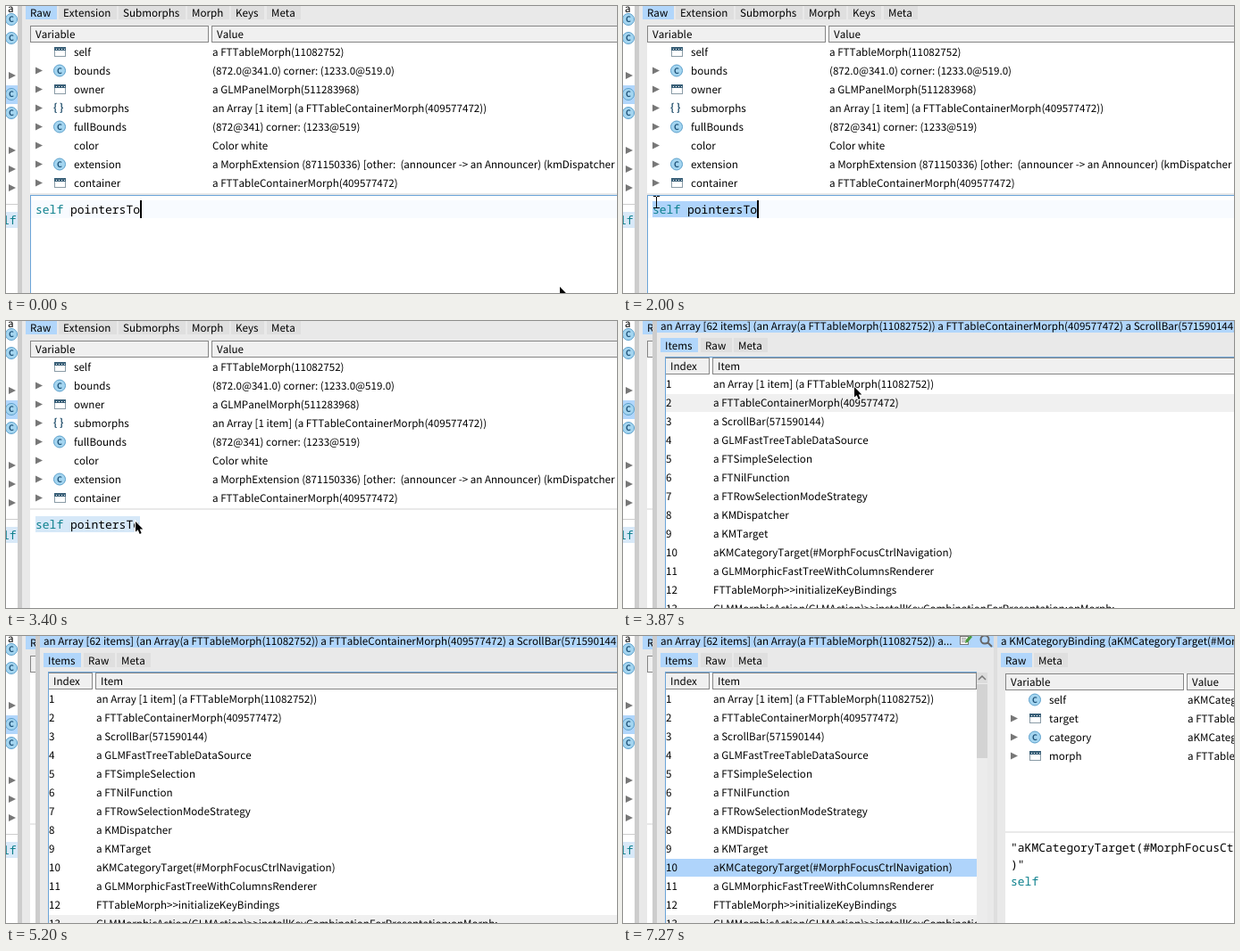
Animation, 684 px wide and 322 px high, one loop 7940 ms. Source, as an HTML page with a canvas:

```html
<!DOCTYPE html>
<html lang="en">
<head>
<meta charset="utf-8">
<title>Object inspector</title>
<style>
  html, body { margin: 0; width: 100%; height: 100%; overflow: hidden; background: #fff; }
  canvas { display: block; }
</style>
</head>
<body>
<canvas id="stage" width="684" height="322"></canvas>
<script>
const W = 684, H = 322, LOOP = 7940;
const ctx = document.getElementById('stage').getContext('2d');
ctx.textRendering = 'geometricPrecision';
ctx.fontKerning = 'none';

const BLUE = '#b1d6fb', PANEL = '#e9e9e9', EDGE = '#cdcdcd', FOCUS = '#6ba4d8';
const TEAL = '#0b7f8c', INK = '#000';
const SANS_FAMILY = '"Noto Sans CJK SC", "Noto Sans CJK JP", "Noto Sans", sans-serif';
const SANS = `11.62px ${SANS_FAMILY}`;
const MONO = '13px "Noto Sans Mono", "DejaVu Sans Mono", monospace';
const CHAR = 7.8; // advance of one code character

// The picture advances 15 times a second; these are tick numbers.
const SELECT = 30, BLUR = 33, WINDOW = 56, SPLIT = 93;
const IBEAM_FROM = 11;

// Pointer path: [tick, x, y]
const PATH = [
  [0, 620, 315], [12, 150, 227], [19, 25, 219], [24, 34, 226], [27, 37, 220], [30, 37, 220],
  [41, 91, 274], [43, 95, 275], [48, 95, 275], [51, 145, 225], [58, 259, 74], [60, 271, 48],
  [63, 268, 25], [68, 268, 25], [77, 200, 326], [86, 200, 326], [90, 117, 266],
  [99, 117, 266], [108, 112, 326], [120, 112, 326],
];

const MORPH_ROWS = [
  ['self', 'window', 'a FTTableMorph(11082752)'],
  ['bounds', 'class', '(872.0@341.0) corner: (1233.0@519.0)'],
  ['owner', 'window', 'a GLMPanelMorph(511283968)'],
  ['submorphs', 'braces', 'an Array [1 item] (a FTTableContainerMorph(409577472))'],
  ['fullBounds', 'class', '(872@341) corner: (1233@519)'],
  ['color', '', 'Color white'],
  ['extension', 'class', 'a MorphExtension (871150336) [other:  (announcer -> an Announcer) (kmDispatcher -> a KMDispatcher)]'],
  ['container', 'window', 'a FTTableContainerMorph(409577472)'],
];
const BINDING_ROWS = [
  ['self', 'class', 'aKMCategoryBinding'],
  ['target', 'window', 'a FTTableMorph(11082752)'],
  ['category', 'class', 'aKMCategoryTarget'],
  ['morph', 'window', 'a FTTableMorph(11082752)'],
];
const ITEMS = [
  'an Array [1 item] (a FTTableMorph(11082752))',
  'a FTTableContainerMorph(409577472)',
  'a ScrollBar(571590144)',
  'a GLMFastTreeTableDataSource',
  'a FTSimpleSelection',
  'a FTNilFunction',
  'a FTRowSelectionModeStrategy',
  'a KMDispatcher',
  'a KMTarget',
  'aKMCategoryTarget(#MorphFocusCtrlNavigation)',
  'a GLMMorphicFastTreeWithColumnsRenderer',
  'FTTableMorph>>initializeKeyBindings',
  'GLMMorphicAction(GLMAction)>>installKeyCombinationForPresentation:onMorph:',
];

function box(x, y, w, h, fill, stroke) {
  ctx.fillStyle = fill;
  ctx.fillRect(x, y, w, h);
  if (stroke) {
    ctx.strokeStyle = stroke;
    ctx.lineWidth = 1;
    ctx.strokeRect(x + .5, y + .5, w - 1, h - 1);
  }
}

function text(string, x, baseline, color = INK, font = SANS) {
  ctx.font = font;
  ctx.fillStyle = color;
  ctx.fillText(string, x, baseline);
}

const code = (string, x, baseline, color) => text(string, x, baseline, color, MONO);

function polygon(x, y, points, fill) {
  ctx.beginPath();
  points.forEach(([dx, dy]) => ctx.lineTo(x + dx, y + dy));
  ctx.closePath();
  ctx.fillStyle = fill;
  ctx.fill();
}

const expander = (x, y) => polygon(x, y, [[-3, -4], [5, 0], [-3, 4]], '#777');

function icon(kind, x, y) {
  if (kind === 'class') {
    ctx.beginPath();
    ctx.arc(x, y, 6.5, 0, 7);
    ctx.fillStyle = '#a4d5f0';
    ctx.fill();
    ctx.strokeStyle = '#5a9fcb';
    ctx.lineWidth = 1;
    ctx.stroke();
    text('C', x - 3, y + 3.2, '#1f5379', `bold 9px ${SANS_FAMILY}`);
  } else if (kind === 'window') {
    const top = Math.floor(y) - 5;
    box(x - 6, top, 13, 11, '#fff', '#8a9ba6');
    box(x - 6, top, 13, 4, '#3a6078');
    for (let i = 0; i < 4; i++) box(x - 4 + i * 3, top + 2, 1, 1, '#fff');
  } else if (kind === 'braces') {
    text('{ }', x - 7, y + 3.5, '#2d5873', `bold ${SANS}`);
  }
}

function tabs(y, labels) {
  labels.forEach(([label, x], i) => {
    ctx.font = SANS;
    const width = Math.ceil(ctx.measureText(label).width) + 11;
    box(x - 5, y, width, 16, i ? '#dfdfdf' : BLUE);
    text(label, x, y + 13);
  });
}

function header(x, y, right, split, first, second) {
  box(x, y, split - x, 19, '#f0f0f0', '#858585');
  box(split + 3, y, right - split - 3, 19, '#f0f0f0', '#858585');
  text(first, x + 6, y + 14);
  text(second, split + 9, y + 14);
}

// Table of variables whose left edge is x and whose header starts at y.
function variables(x, y, rows, bottom) {
  box(x, y, W - x, bottom - y, '#fff');
  header(x, y, W + 2, x + 200, 'Variable', 'Value');
  rows.forEach(([name, kind, value], i) => {
    const mid = y + 29.5 + i * 21;
    if (i) expander(x + 9, mid);
    icon(kind, x + 33, mid);
    text(name, x + 49, mid + 4.5);
    text(value, x + 204, mid + 4.5);
  });
}

function backgroundWindow() {
  box(0, 0, 13, H, '#fff');
  box(0, 89, 13, 21, BLUE);
  text('a', 2, 7);
  [15, 36, 99, 120].forEach(y => icon('class', 6, y));
  [78, 162, 183, 204].forEach(y => expander(6, y));
  box(0, 222, 13, 1, EDGE);
  box(0, 231, 13, 18, '#d8e9f8');
  code('lf', -4, 245, TEAL);
}

function morphInspector(tick) {
  const focused = tick < BLUR;
  box(13, 0, W, H, PANEL);
  box(13, 0, 5, H, EDGE);
  tabs(-1, [['Raw', 27], ['Extension', 64], ['Submorphs', 131], ['Morph', 208], ['Keys', 257], ['Meta', 297]]);
  variables(27, 22, MORPH_ROWS, 210);
  box(27, 212, W, H, '#fff');
  if (focused) {
    box(28, 218, W, 20, '#f8fbff');
    box(27, 212, W, 1, FOCUS);
    box(27, 212, 1, H, FOCUS);
  }
  if (tick >= SELECT) box(33, 219, 15 * CHAR, 18, focused ? '#afd4fb' : '#d6e8f8');
  code('self', 33, 233, TEAL);
  code('pointersTo', 33 + 5 * CHAR, 233);
  if (focused) box(150, 218, 2, 20, INK);
}

function titleButtons() {
  box(377, 0, 10, 10, '#fbfbfb', '#777');
  for (let y = 2; y < 8; y += 2) box(379, y, 5, 1, '#999');
  polygon(383, 8, [[0, 0], [1, -4], [6, -9], [8, -7], [3, -1]], '#4c9a3f');
  ctx.beginPath();
  ctx.arc(405, 4, 4.5, 0, 7);
  ctx.moveTo(408, 7);
  ctx.lineTo(413, 12);
  ctx.strokeStyle = '#666';
  ctx.lineWidth = 2;
  ctx.stroke();
}

function scrollBar() {
  box(396, 41, 12, H, '#ececec');
  box(396, 41, 12, 12, '#dcdcdc');
  ctx.beginPath();
  ctx.moveTo(398, 49);
  ctx.lineTo(402, 45);
  ctx.lineTo(406, 49);
  ctx.strokeStyle = '#777';
  ctx.lineWidth = 1.5;
  ctx.stroke();
  box(396, 54, 12, 83, '#d3d3d3');
}

function arrayInspector(tick, hovered) {
  const split = tick >= SPLIT;
  const right = split ? 396 : W + 2;
  box(33, 0, W, H, PANEL);
  box(33, 0, 5, H, EDGE);
  box(38, 0, split ? 377 : W, 13, BLUE);
  text('an Array [62 items] (an Array(a FTTableMorph(11082752)) a' +
    (split ? '...' : ' FTTableContainerMorph(409577472) a ScrollBar(571590144) a GLMFast'), 42, 10);
  tabs(19, [['Items', 47], ['Raw', 92], ['Meta', 129]]);

  ctx.save();
  ctx.beginPath();
  ctx.rect(47, 40, right - 47, H);
  ctx.clip();
  box(47, 40, W, H, '#fff');
  header(47, 41, right, 97, 'Index', 'Item');
  box(47, 40, W, 1, FOCUS);
  box(47, 40, 1, H, FOCUS);
  ITEMS.forEach((item, i) => {
    const top = 61 + i * 21;
    const selected = split && i === 9;
    if (selected || i === hovered) box(48, top, W, 20, selected ? '#afd4fb' : '#f0f0f0');
    text(i + 1, 48, top + 14);
    text(item, 101, top + 14);
  });
  ctx.restore();

  if (split) {
    titleButtons();
    scrollBar();
    bindingPane();
  }
}

function bindingPane() {
  box(415, 0, 4, H, '#dedede');
  box(419, 0, W, H, PANEL);
  box(419, 0, W, 13, BLUE);
  text('a KMCategoryBinding (aKMCategoryTarget(#MorphFocusCtrlNavigation))', 423, 10);
  tabs(19, [['Raw', 428], ['Meta', 465]]);
  variables(428, 42, BINDING_ROWS, 219);
  box(428, 221, W, H, '#fff');
  code('"aKMCategoryTarget(#MorphFocusCtrlNavigation', 434, 242);
  code(')"', 434, 261);
  code('self', 434, 280, TEAL);
}

function pointerAt(tick) {
  const next = Math.max(1, PATH.findIndex(([key]) => key >= tick));
  const [t0, x0, y0] = PATH[next - 1], [t1, x1, y1] = PATH[next];
  const k = (tick - t0) / (t1 - t0);
  return [Math.round(x0 + (x1 - x0) * k), Math.round(y0 + (y1 - y0) * k)];
}

function pointer(tick) {
  const [x, y] = pointerAt(tick);
  if (tick >= IBEAM_FROM && tick < BLUR) {
    box(x, y - 6, 1, 13, INK);
    for (const end of [-7, 6]) {
      box(x - 3, y + end, 3, 1, INK);
      box(x + 1, y + end, 3, 1, INK);
    }
    return;
  }
  polygon(x, y, [[0, 0], [0, 11.5], [2.7, 9.2], [4.7, 14], [6.6, 13], [4.7, 8.5], [8.3, 8.5]], INK);
  ctx.strokeStyle = '#fff';
  ctx.lineWidth = 2;
  ctx.stroke();
  ctx.fill();
}

function draw(now) {
  const tick = Math.floor(now % LOOP * .015 + .06);
  backgroundWindow();
  morphInspector(tick);
  if (tick >= WINDOW) {
    // Row highlighting trails the pointer by one tick.
    arrayInspector(tick, Math.floor((pointerAt(tick - 1)[1] - 61) / 21));
  }
  pointer(tick);
}

const start = performance.now();
function frame() {
  draw(performance.now() - start);
  requestAnimationFrame(frame);
}
frame();
</script>
</body>
</html>
```
